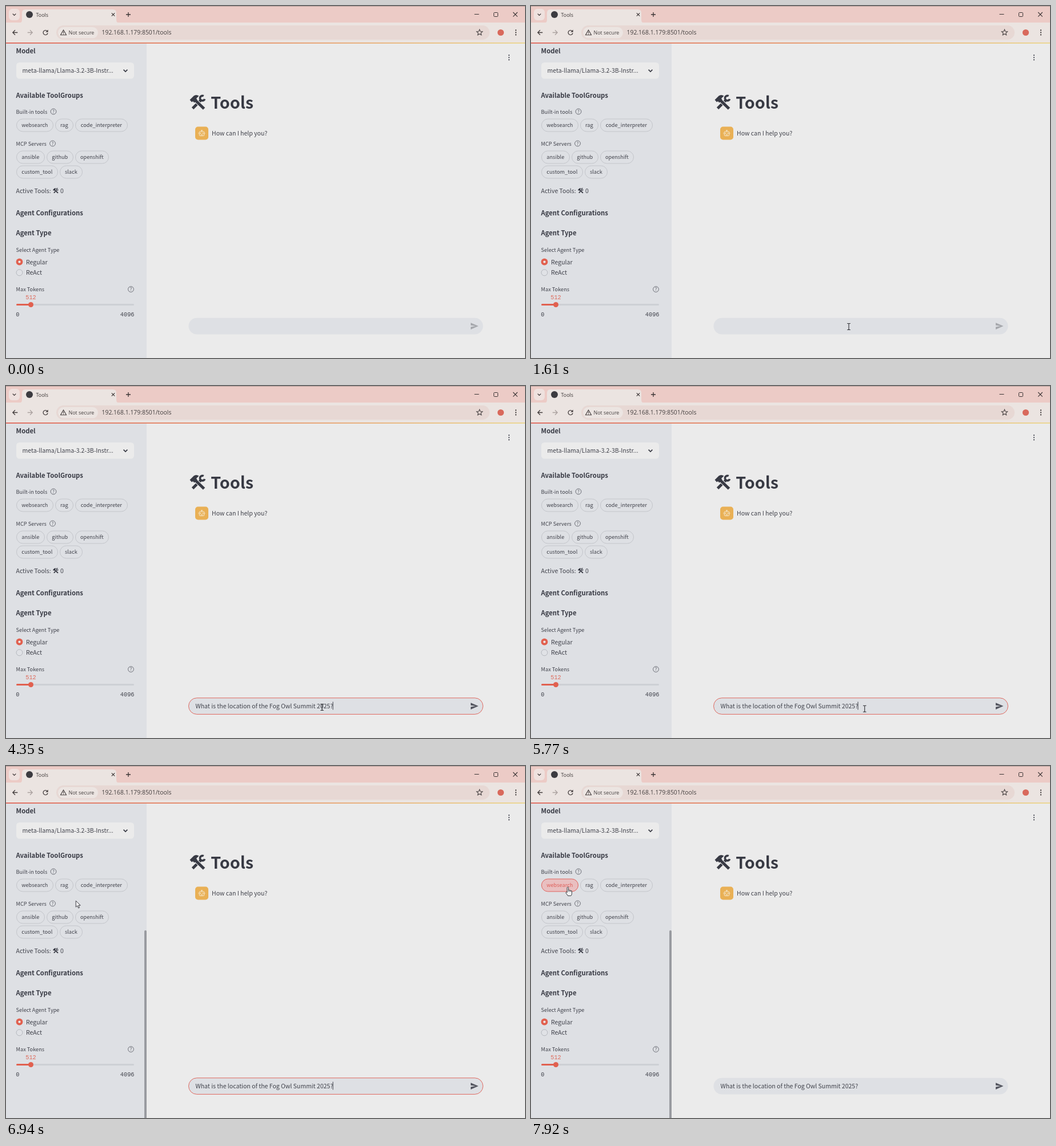
Recreate the animation shown at these times as an HTML page with a canvas. Size 908 by 617 pixels, loop 7.99 s.

```html
<!DOCTYPE html>
<html lang="en">
<head>
<meta charset="utf-8">
<title>Tools</title>
<style>
html, body { margin: 0; width: 100%; height: 100%; overflow: hidden; background: #ebebeb; }
canvas { display: block; width: 908px; height: 617px; }
</style>
</head>
<body>
<canvas id="stage"></canvas>
<script>
const W = 908, H = 617, LOOP = 7990;
const canvas = document.getElementById('stage');
const dpr = window.devicePixelRatio || 1;
canvas.width = W * dpr;
canvas.height = H * dpr;
const c = canvas.getContext('2d');

const SANS = '"Noto Sans CJK JP", "Noto Sans CJK SC", "Noto Sans CJK", "Noto Sans", sans-serif';
const UI = '"Open Sans", "Noto Sans", sans-serif';
const MONO = '"Liberation Mono", monospace';
const BODY = '10.5px ' + SANS;
const SMALL = '9.2px ' + SANS;
const HEAD = '700 11.3px ' + SANS;

const PAGE = '#ebebeb', PANEL = '#dee0e4', INK = '#40424b', DARK = '#383a44';
const RED = '#e1604f', EDGE = '#c3c5ca', CHROME = '#ebe4e1', STRIP = '#eccbc6';
const QUESTION = 'What is the location of the Fog Owl Summit 2025?';

// Event times in ms
const FOCUS = 2690, PASTE = 4350, PICK = 7780, BLINK = 535;

const PILLS = [
  ['websearch', 18, 82, 209], ['rag', 86, 117, 209], ['code_interpreter', 121, 212, 209],
  ['ansible', 18, 67, 265], ['github', 71, 117, 265], ['openshift', 121, 179, 265],
  ['custom_tool', 18, 90, 291], ['slack', 94, 133, 291]
];

// Pointer path: time, x, y
const PATH = [
  [130, 596, -16], [880, 553, 532], [1010, 554, 553], [1210, 554, 553], [1610, 556, 562],
  [2340, 556, 562], [2690, 553, 563], [5560, 553, 563], [5770, 584, 566], [6330, 430, 430],
  [6400, 430, 430], [6940, 122, 236], [7080, 112, 230], [7150, 112, 230], [7560, 64, 213]
];

function text(s, x, y, font, color = INK, align = 'left') {
  c.font = font;
  c.fillStyle = color;
  c.textAlign = align;
  c.fillText(s, x, y);
}

function box(x, y, w, h, r, fill, stroke) {
  c.beginPath();
  c.roundRect(x, y, w, h, r);
  paint(fill, stroke);
}

function disc(x, y, r, fill, stroke, width = 1) {
  c.beginPath();
  c.arc(x, y, r, 0, Math.PI * 2);
  paint(fill, stroke, width);
}

function paint(fill, stroke, width = 1) {
  if (fill) { c.fillStyle = fill; c.fill(); }
  if (stroke) { c.strokeStyle = stroke; c.lineWidth = width; c.stroke(); }
}

// SVG path placed at x, y
function icon(d, x, y, fill, stroke, width = 1.2, scale = 1) {
  c.save();
  c.translate(x, y);
  c.scale(scale, scale);
  const p = new Path2D(d);
  if (fill) { c.fillStyle = fill; c.fill(p); }
  if (stroke) { c.strokeStyle = stroke; c.lineWidth = width; c.stroke(p); }
  c.restore();
}

function dots(x, y, color) {
  for (const dy of [-4, 0, 4]) disc(x, y + dy, 1.15, color);
}

function help(x, y) {
  disc(x, y, 4.9, null, '#6b6d75', 1);
  text('?', x, y + 2.8, '7.5px ' + SANS, '#55575f', 'center');
}

function star(x, y, r) {
  c.beginPath();
  for (let i = 0; i < 10; i++) {
    const a = i * Math.PI / 5 - Math.PI / 2, k = i % 2 ? r * 0.45 : r;
    c.lineTo(x + k * Math.cos(a), y + k * Math.sin(a));
  }
  c.closePath();
  paint(null, '#4a4444', 1.1);
}

// Crossed hammer and wrench in a 28 unit square
function tools(x, y, size, back) {
  const s = size / 28;
  icon('M5 24L19 10', x, y, null, DARK, 4.8, s);
  icon('M24.2 2.2A4.3 4.3 0 1 0 26.2 7.6', x, y, null, DARK, 3.6, s);
  icon('M10 10L26 25', x, y, null, back, 7, s);
  icon('M10 10L25 24.5', x, y, null, DARK, 5, s);
  icon('M0 9L7 2Q11 -1 16 2L11.5 6.5L13 9L8 14L5.5 11.5L3.5 13Z', x, y, DARK, null, 1, s);
}

function browser() {
  c.fillStyle = STRIP;
  c.fillRect(0, 0, W, 30);
  c.fillStyle = '#b89f9a';
  c.fillRect(0, 0, W, 1);
  box(5, 5, 19, 20, 6, '#eee1de');
  icon('M-2.8 -1.4L0 1.4L2.8 -1.4', 14.5, 15, null, '#3a3434', 1.3);
  icon('M0 27Q6 27 6 21V9Q6 3 12 3H165Q171 3 171 9V21Q171 27 177 27Z', 22, 3, CHROME);
  c.fillStyle = CHROME;
  c.fillRect(0, 29, W, 35);
  disc(41, 15, 6, '#3b3b40');
  text('Tools', 52.5, 18.5, '8.9px ' + UI, '#3c3737');
  icon('M-2.7 -2.7L2.7 2.7M2.7 -2.7L-2.7 2.7', 187.5, 15, null, '#3a3434');
  icon('M-4 0H4M0 -4V4', 214, 15, null, '#3a3434', 1.3);
  icon('M-4 0H4', 823.5, 14.5, null, '#3a3434', 1);
  box(853.5, 11.5, 7, 7, 1, null, '#3a3434');
  icon('M-3.8 -3.8L3.8 3.8M3.8 -3.8L-3.8 3.8', 891, 14.8, null, '#3a3434', 1.1);

  const arrow = 'M4.3 0H-4M0 -4.2L-4.2 0L0 4.2';
  icon(arrow, 16, 46.5, null, '#453f3f', 1.3);
  c.save();
  c.translate(42, 46.5);
  c.scale(-1, 1);
  icon(arrow, 0, 0, null, '#aba2a0', 1.3);
  c.restore();
  icon('M3.2 -2.4A4 4 0 1 0 4 1', 69, 46.5, null, '#453f3f', 1.3);
  icon('M4.6 -5V-0.8H0.4Z', 69, 46.5, '#453f3f');

  box(88, 34, 758, 25, 12.5, '#e7d8d4');
  box(91, 37, 70, 19.5, 9.7, '#ece5e2');
  icon('M0 -4.4L5 4.2H-5Z', 100.5, 46.5, null, '#453f3f', 1.1);
  icon('M0 -1.5V1.3M0 2.1V3.2', 100.5, 46.5, null, '#453f3f', 1);
  text('Not secure', 109.5, 49.8, '8.9px ' + UI, '#453f3f');
  text('192.168.1.179:8501/tools', 167.5, 50, '10.4px ' + UI, '#454040');
  star(828.5, 46.5, 5.4);
  disc(865.5, 46.5, 5.6, '#d9695c');
  dots(892, 46.5, '#453f3f');
}

function sidebar(t, pointer) {
  c.fillStyle = PANEL;
  c.fillRect(0, 64, 246, H - 64);
  text('Model', 17.5, 83.3, HEAD, DARK);
  box(18, 99, 206, 28.5, 5.5, PAGE);
  text('meta-llama/Llama-3.2-3B-Instr...', 28.5, 117.3, BODY);
  icon('M-3.4 -1.7L0 1.7L3.4 -1.7', 209, 113.3, null, DARK, 1.7);

  text('Available ToolGroups', 17.5, 160.7, HEAD, DARK);
  text('Built-in tools', 17.5, 188.6, SMALL);
  help(83, 185);
  text('MCP Servers', 17.5, 244.6, SMALL);
  help(81.5, 241);
  for (const [name, x0, x1, y] of PILLS) {
    const first = name === 'websearch';
    const hot = first && (pointer.kind === 'hand' || t >= PICK);
    box(x0 + 0.5, y - 11, x1 - x0, 22, 11, PANEL);
    if (first && t >= PICK) {
      c.globalAlpha = Math.min(1, (t - PICK) / 120);
      c.fillStyle = '#e9bfc0';
      c.fill();
      c.globalAlpha = 1;
    }
    paint(null, hot ? '#e0625c' : EDGE, 1);
    text(name, (x0 + x1) / 2 + 0.3, y + 3.3, SMALL, hot ? '#df5f59' : INK, 'center');
  }

  text('Active Tools:', 17.5, 327.8, BODY);
  tools(82, 319, 10, PANEL);
  text('0', 95, 327.8, BODY);
  text('Agent Configurations', 17.5, 366.5, HEAD, DARK);
  text('Agent Type', 17.5, 402.3, HEAD, DARK);
  text('Select Agent Type', 17.5, 430.5, SMALL);
  disc(23.5, 448.5, 5.9, RED);
  disc(23.5, 448.5, 2.1, PAGE);
  text('Regular', 35, 452.5, BODY);
  disc(23.5, 467.3, 5.4, '#e0e2e6', '#b3b6bc', 1);
  text('ReAct', 35, 471.2, BODY);

  text('Max Tokens', 17.5, 500.2, SMALL);
  help(218.5, 496.5);
  const mono = '10.27px ' + MONO;
  text('512', 43.5, 514.3, mono, '#df6a5b', 'center');
  box(18, 522, 206, 3, 1.5, '#cdd0d5');
  box(18, 522, 26, 3, 1.5, RED);
  disc(43.5, 523.5, 4.5, RED);
  text('0', 17.3, 543.8, mono);
  text('4096', 224.5, 543.8, mono, INK, 'right');

  if (pointer.x < 246 && t > 6460) box(242, 288, 4, 332, 2, '#999ba0');
}

function robot(x, y) {
  const light = '#f6ead2';
  box(x - 11.5, y - 11.5, 23, 23, 5, '#e9b055');
  box(x - 4.2, y - 3, 8.4, 7.5, 1.2, null, light);
  icon('M0 -3V-5M-1.5 -5H1.5M-4.7 0H-6M4.7 0H6M-2 2.6H2', x, y, null, light, 1);
  disc(x - 2, y, 0.9, light);
  disc(x + 2, y, 0.9, light);
}

function main(t) {
  dots(880, 90.3, '#44464f');
  tools(321.5, 155.5, 28, PAGE);
  text('Tools', 358.3, 179.6, '700 28.7px ' + SANS, DARK);
  robot(342.5, 223);
  text('How can I help you?', 360, 227, BODY);

  const focused = t >= FOCUS && t < PICK;
  const filled = t >= PASTE;
  box(319.5, 546.8, 515, 28.6, 14.3, PANEL, focused ? '#e0695f' : null);
  icon('M0 0L13.5 5.8L0 11.6V7.1L8.5 5.8L0 4.5Z', 813, 555.3, filled ? '#555761' : '#a6a8ad');

  let caretX = 332;
  if (filled) {
    text(QUESTION, 331.5, 564.8, BODY);
    caretX = 331.5 + c.measureText(QUESTION).width + 0.3;
  }
  const since = t - (filled ? PASTE : FOCUS);
  if (focused && Math.floor(since / BLINK) % 2 === 0) {
    c.fillStyle = '#3c3e47';
    c.fillRect(Math.round(caretX) - 0.5, 553.5, 1, 14);
  }
}

function pointerAt(t) {
  let i = 0;
  while (i < PATH.length - 1 && PATH[i + 1][0] <= t) i++;
  const a = PATH[i], b = PATH[i + 1] || a;
  const k = b === a ? 0 : Math.max(0, (t - a[0]) / (b[0] - a[0]));
  const x = a[1] + (b[1] - a[1]) * k, y = a[2] + (b[2] - a[2]) * k;
  let kind = 'arrow';
  if (x > 319 && x < 812 && y > 547 && y < 576) kind = 'beam';
  if (x > 18 && x < 82 && y > 198 && y < 220) kind = 'hand';
  return { x, y, kind };
}

function drawPointer({ x, y, kind }) {
  if (kind === 'beam') {
    icon('M-2.8 -5.5H-0.8L0 -4.8L0.8 -5.5H2.8M0 -4.8V4.8M-2.8 5.5H-0.8L0 4.8L0.8 5.5H2.8',
      x, y, null, '#2c2d32', 1.1);
  } else if (kind === 'hand') {
    icon('M-1.2 1Q-1.2 -0.4 0 -0.4Q1.2 -0.4 1.2 1V5.2Q2.4 4.4 3.3 5.5Q4.5 4.9 5.2 6Q7 5.6 7 7.5' +
      'V11Q7 13.5 5.5 15H0Q-1 12.8 -3.2 10.3Q-4 9 -2.8 8.5Q-2 8.4 -1.2 9.4Z',
      x + 0.4, y - 0.5, '#f4f4f5', '#35363b', 1);
    icon('M1.2 5.2V8M3.3 5.5V8M5.2 6V8', x + 0.4, y - 0.5, null, '#35363b', 0.8);
  } else {
    icon('M0 0V11L2.6 8.6L4.4 12.8L6.3 12L4.5 8H8Z', x + 0.3, y + 0.3, '#f2f2f3', '#3d3e44', 1);
  }
}

function render(t) {
  c.setTransform(dpr, 0, 0, dpr, 0, 0);
  c.fillStyle = PAGE;
  c.fillRect(0, 0, W, H);
  const pointer = pointerAt(t);
  browser();
  sidebar(t, pointer);
  main(t);
  const line = c.createLinearGradient(0, 0, W, 0);
  line.addColorStop(0, '#e06659');
  line.addColorStop(0.5, '#e69468');
  line.addColorStop(1, '#ebd68c');
  c.fillStyle = line;
  c.fillRect(0, 64, W, 1.8);
  if (t >= PATH[0][0]) drawPointer(pointer);
}

const start = performance.now();
function tick() {
  render((performance.now() - start) % LOOP);
  requestAnimationFrame(tick);
}
tick();
</script>
</body>
</html>
```
